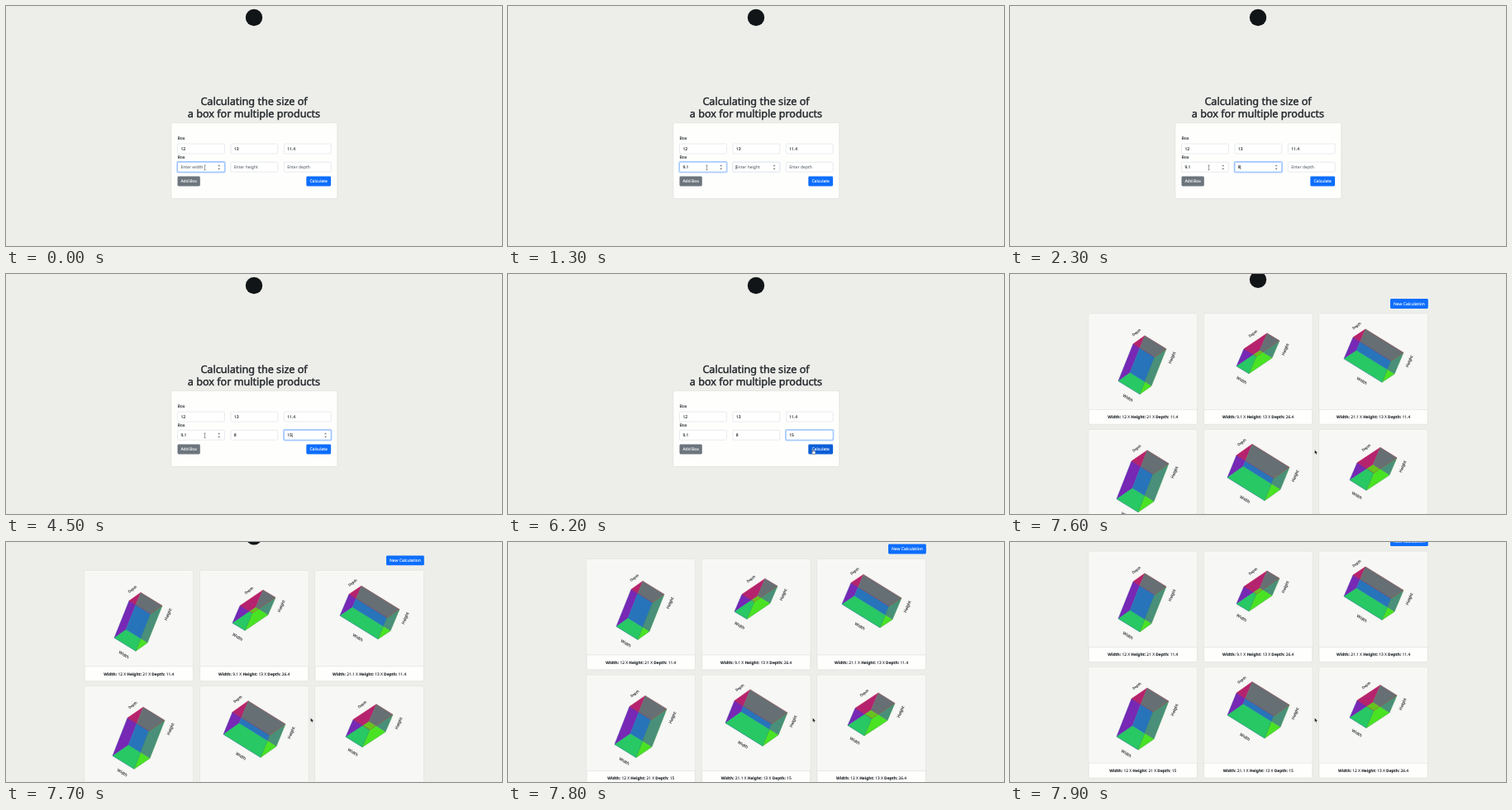
An HTML page for the animation above (8000 ms loop, 600x291 px).

```html
<!DOCTYPE html>
<html lang="en">
<head>
<meta charset="utf-8">
<title>Box size calculator</title>
<style>
  html, body { margin: 0; height: 100%; overflow: hidden; background: #edeeea; }
  svg { display: block; width: 100vw; height: 100vh; }
  text { font: 5px "Noto Sans", "Open Sans", sans-serif; fill: #212529; stroke: #212529; stroke-width: .1px; text-rendering: geometricPrecision; white-space: pre; }
  .mid { text-anchor: middle; }
  .title { font-size: 12.6px; stroke-width: .42px; }
  .hint { fill: #6c757d; stroke: #6c757d; }
  .light { fill: #fff; stroke: #fff; }
  .size { font-size: 4.85px; }
  .size tspan { font-weight: 700; }
  .card { stroke: #d4d6d3; stroke-width: .5; }
</style>
</head>
<body>
<svg viewBox="0 0 600 291">
  <g id="page">
    <circle cx="300" cy="14" r="10.2" fill="#111517"/>
    <g id="form"></g>
    <g id="results"></g>
  </g>
  <g id="cursor"></g>
</svg>
<script>
const LOOP = 8000, RESULTS_AT = 6350, CLICK = 6180;
const $ = id => document.getElementById(id);
const clamp = x => Math.max(0, Math.min(1, x));
const smooth = x => { x = clamp(x); return x * x * (3 - 2 * x); };
const add = (...ps) => ps.reduce((a, b) => [a[0] + b[0], a[1] + b[1]]);

const text = (x, y, s, cls = '', more = '') => `<text x="${x}" y="${y}" class="${cls}" ${more}>${s}</text>`;
const rect = (x, y, w, h, fill, more = '') =>
  `<rect x="${x}" y="${y}" width="${w}" height="${h}" rx="1.4" fill="${fill}" ${more}/>`;
const button = (x, y, w, fill, label) =>
  rect(x, y, w, 11.9, fill) + text(x + w / 2, y + 7.7, label, 'mid light');

// Form
const COLS = [207.5, 271.9, 336.3], ROW1 = 167.1, ROW2 = 189.3;
const HINTS = ['Enter width', 'Enter height', 'Enter depth'];
const TYPED = [
  [[300, '9'], [500, '9.'], [800, '9.1']],
  [[2300, '8']],
  [[3900, '1'], [4500, '15']]
];
const FOCUS = [-500, 1270, 2850, CLICK];
const CARET_RESETS = [-600, 300, 500, 800, 1300, 2300, 2900, 3900, 4500];

function field(x, y, value, { hint = '', focus = 0, caret = false, spin = false } = {}) {
  const ring = focus > 0 ? rect(x - .6, y - .6, 58.1, 13.1, 'none',
    `stroke="#0d6efd" stroke-opacity="${.32 * focus}" stroke-width="1.3"`) : '';
  const edge = `rgb(${206 - 84 * focus},${212 - 36 * focus},${218 + 36 * focus})`;
  const arrows = spin ? `<path d="M${x + 48.7} ${y + 5}l1.5-1.9 1.5 1.9zm0 2.4l1.5 1.9 1.5-1.9z" fill="#6e7174"/>` : '';
  return ring + rect(x, y, 56.9, 11.9, '#fff', `stroke="${edge}" stroke-width="${.5 + .25 * focus}"`) + arrows
    + (value ? '' : text(x + 3.9, y + 7.8, hint, 'hint'))
    + text(x + 3.9, y + 7.8, value + (caret ? '<tspan dx="-1.3">|</tspan>' : ''));
}

function drawForm(t, [mx, my]) {
  const reset = CARET_RESETS.filter(r => r <= t).pop();
  const blink = (t - reset) % 1100 < 600;
  const fields = COLS.map((x, i) => {
    const value = TYPED[i].filter(k => k[0] <= t).map(k => k[1]).pop() || '';
    const focus = smooth((t - FOCUS[i]) / 150) - smooth((t - FOCUS[i + 1]) / 150);
    const active = t >= FOCUS[i] && t < FOCUS[i + 1];
    const hover = mx > x && mx < x + 57 && my < ROW2 + 12;
    return field(x, ROW2, value, { hint: HINTS[i], focus, caret: active && blink, spin: active || hover });
  });
  const pressed = smooth((t - CLICK) / 150);
  const glow = pressed ? rect(362.7, 205.9, 31, 13.1, 'none',
    `stroke="#0d6efd" stroke-opacity="${.5 * pressed}" stroke-width="1.25"`) : '';
  return text(300, 120.4, 'Calculating the size of', 'mid title')
    + text(300, 135.4, 'a box for multiple products', 'mid title')
    + rect(199.8, 141.7, 201, 91.8, '#fefefd', 'class="card"')
    + text(207.5, 162.4, 'Box') + text(207.5, 184.7, 'Box')
    + ['12', '13', '11.4'].map((v, i) => field(COLS[i], ROW1, v)).join('')
    + fields.join('')
    + button(207.5, 206.5, 27.3, '#6c757d', 'Add Box')
    + glow + button(363.3, 206.5, 29.8, mx > 363 ? '#0b5ed7' : '#0d6efd', 'Calculate');
}

// Results: sizes, near-left corner and the projected width, height and depth edges
const BOXES = [
  { size: [12, 21, 11.4], o: [131, 137], w: [26, 16], h: [18, -45], d: [14, -10] },
  { size: [9.1, 13, 26.4], o: [274, 119], w: [15, 9], h: [9, -21], d: [28, -19] },
  { size: [21.1, 13, 11.4], o: [404, 110], w: [46, 28.5], h: [11, -26], d: [15, -10] },
  { size: [12, 21, 15], o: [129, 280], w: [26, 16], h: [18, -46], d: [19, -13] },
  { size: [21.1, 13, 15], o: [263, 254], w: [45, 28], h: [11, -27], d: [19, -13.5] },
  { size: [12, 13, 26.4], o: [411, 257], w: [20, 12.5], h: [9, -21], d: [28, -18.5] }
];

const face = (p, a, b, fill, alpha, edge) =>
  `<polygon points="${[p, add(p, a), add(p, a, b), add(p, b)].join(' ')}" fill="${fill}" fill-opacity="${alpha}" stroke="${edge}" stroke-width=".45" stroke-opacity=".7"/>`;

function label([x, y], angle, s, size) {
  return text(0, size * .35, s, 'mid', `style="font-size:${size}px" transform="translate(${x} ${y}) rotate(${angle})"`);
}

function solid({ o, w, h, d }) {
  const half = v => [v[0] / 2, v[1] / 2];
  return face(o, h, d, 'rgb(182,9,154)', 1, '#a02890')
    + face(add(o, d), w, h, 'rgb(62,125,162)', 1, '#3a8a8a')
    + face(o, w, d, 'rgb(62,255,31)', 1, '#30b050')
    + face(o, w, h, 'rgb(0,97,229)', .35, '#2858c0')
    + face(add(o, w), h, d, 'rgb(94,174,43)', .35, '#50b040')
    + face(add(o, h), w, d, 'rgb(177,83,29)', .35, '#e02838')
    + label(add(o, half(w), [-1.3, 12.3]), 31, 'Width', 4.8)
    + label(add(o, w, h, d, [7, 10.5]), -67, 'Height', 4.8)
    + label(add(o, h, half(d), [-3, -9]), -36, 'Depth', 4.1);
}

function resultCard(box, i) {
  const x = 95.2 + 139.4 * (i % 3), y = 55.2 + 140.6 * Math.floor(i / 3);
  const [w, h, d] = box.size;
  return rect(x, y, 131.2, 134.2, '#fefefd', 'class="card"')
    + `<path d="M${x + .25} ${y + 116.3}h130.7V${y + 1}h-130.7z" fill="#f7f7f5"/>`
    + `<path d="M${x} ${y + 116.3}h131.2" class="card"/>`
    + text(x + 65.6, y + 127.1, `<tspan>Width:</tspan> ${w} X <tspan>Height:</tspan> ${h} X <tspan>Depth:</tspan> ${d}`, 'mid size')
    + solid(box);
}

$('results').innerHTML = button(460, 37.2, 45.8, '#0d6efd', 'New Calculation') + BOXES.map(resultCard).join('');

// Motion
const SCROLL = [[7550, 0], [7600, 7], [7700, 20.6], [7800, 34.5], [7900, 44]];
function scrollAt(t) {
  return SCROLL.slice(1).reduce((y, [t1, y1], i) => {
    const [t0, y0] = SCROLL[i];
    return y + (y1 - y0) * clamp((t - t0) / (t1 - t0));
  }, 0);
}

function mouseAt(t) {
  const k = smooth((t - 5050) / 850), end = smooth((t - 5910) / 130);
  return [240.5 + 117 * k + 11 * end, 195.8 + 17 * k + .4 * end];
}

const CURSORS = {
  beam: '<path d="M-1.1-2.7h2.2M0-2.7v5.6M-1.1 2.9h2.2" fill="none" stroke="#444" stroke-width=".5"/>',
  arrow: '<path d="M0 0v5l1.2-1 .8 1.8.9-.4-.8-1.7h1.6z" fill="#111" stroke="#fff" stroke-width=".35"/>',
  hand: '<path d="M0-.8q.6-.5 1 0v2.2l2 .5q.7.3.5 1.2l-.5 2.1h-2.7l-1.7-2.2q-.1-.8.7-.5l.7.5z" fill="#fff" stroke="#222" stroke-width=".35"/>'
};

function draw(t) {
  const done = t >= RESULTS_AT, mouse = mouseAt(t);
  const kind = done ? 'arrow' : mouse[0] > 363 ? 'hand' : mouse[1] < 201 ? 'beam' : 'arrow';
  $('form').innerHTML = done ? '' : drawForm(t, mouse);
  $('results').style.display = done ? '' : 'none';
  $('page').setAttribute('transform', `translate(0 ${-scrollAt(t)})`);
  $('cursor').innerHTML = CURSORS[kind];
  $('cursor').setAttribute('transform', `translate(${mouse})`);
}

const start = performance.now();
function tick() {
  draw((performance.now() - start) % LOOP);
  requestAnimationFrame(tick);
}
tick();
</script>
</body>
</html>
```
